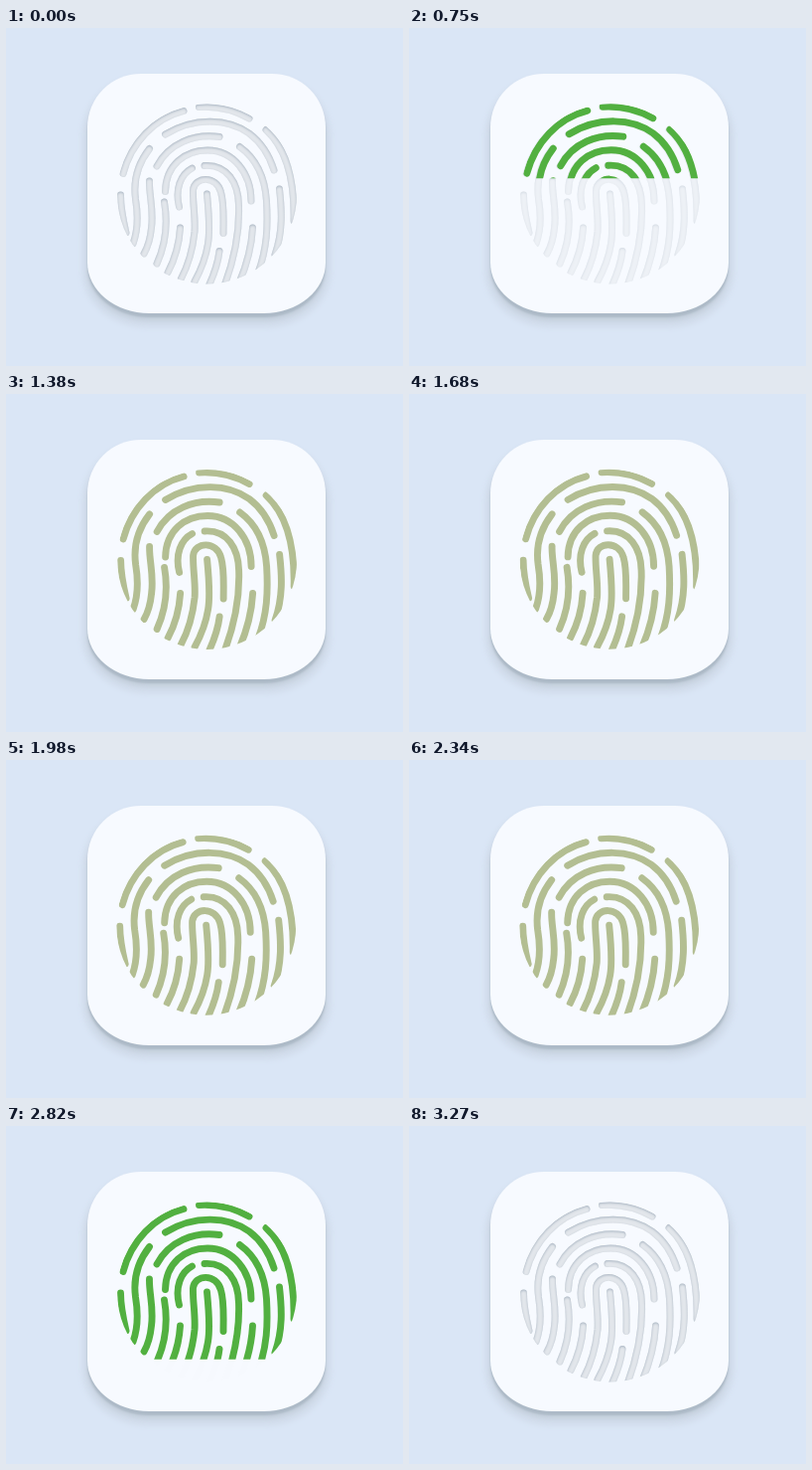
Write an HTML page that moves like this. It is 400 px wide and 340 px high and loops after 3.37 s.

```html
<!DOCTYPE html>
<html lang="en">
<head>
<meta charset="utf-8">
<title>Fingerprint scan</title>
<style>
html, body { margin: 0; width: 100%; height: 100%; overflow: hidden; background: #dae6f6; }
#tile {
  position: absolute; left: 82px; top: 46px; width: 240px; height: 241px;
  border-radius: 54px 54px 62px 62px / 54px 54px 51px 51px; background: #f7faff;
  box-shadow: 0 4px 2px #adbac7, 0 8px 4px #c5d0dd, 0 9px 5px 6px #d2ddec;
}
svg { position: absolute; left: 0; top: 0; display: block; }
</style>
</head>
<body>
<div id="tile"></div>
<svg width="400" height="340" viewBox="0 0 400 340">
  <defs>
    <clipPath id="disc"><circle cx="202.5" cy="167" r="90.5"/></clipPath>
    <clipPath id="wipe"><rect id="edge" width="400" height="340"/></clipPath>
    <filter id="inset" x="-5%" y="-5%" width="110%" height="110%" color-interpolation-filters="sRGB">
      <feGaussianBlur in="SourceAlpha" stdDeviation="1.1"/>
      <feOffset dx=".2" dy=".7" result="soft"/>
      <feFlood flood-color="#a9b5c2"/>
      <feComposite in2="soft" operator="out"/>
      <feComposite in2="SourceAlpha" operator="in" result="shade"/>
      <feMerge><feMergeNode in="SourceGraphic"/><feMergeNode in="shade"/></feMerge>
    </filter>
    <g id="print" clip-path="url(#disc)">
      <path fill="none" stroke-width="6.9" stroke-linecap="round" d="
        M118 146.500C126 116 149 91 179 83.500
        M194.500 79.500C212 78.500 229 82 245 91
        M262 102.500C281 120 291 150 290 194
        M160.500 107C190 89 224 91 245 106C257 115 265 127 270 143
        M144.500 121.500C130 140 128.500 157 130.500 172C133 187 133.500 202 128 217
        M115.500 168C115.500 180 117.500 191 121 206
        M152 139C164 116 189 106 215 109.500
        M235.500 119.500C253 132 261 152 262.500 174C264 200 263 222 254 246
        M144.500 154C144 168 149 182 146.500 201C145.500 211 143 220 139 227
        M160.500 164.500C161 138 180 123 203 123C229 123 247 146 247 174
        M159.500 175C163 195 161 217 152 237
        M187.500 141C176 147 170 162 174.500 180
        M200 138.500C223 137 234 156 234.500 178C235.500 206 231 231 219 262
        M175.500 201C174.500 217 171 231 163 246
        M219 206.500C219 190 220 177 216.500 165C212 148 190 149 188.500 163C188 176 191 190 190 205C188 224 184 238 176 253
        M202.500 167C204 182 206 202 203.500 217C201 233 196 244 190 255
        M215 224.500C213.500 237 210 247 204 260
        M248.500 201C247.500 219 244 235 235 256
        M275.500 162C278 184 279 205 271 228"/>
    </g>
  </defs>
  <g id="groove" filter="url(#inset)"><use href="#print" stroke="#e2e6eb"/></g>
  <g clip-path="url(#wipe)"><use id="ink" href="#print"/></g>
</svg>
<script>
const LOOP = 3370, TOP = 76, BOTTOM = 258;
const GREEN = [82, 176, 64], OLIVE = [179, 190, 146];
const [groove, ink, edge] = ["groove", "ink", "edge"].map(id => document.getElementById(id));

// progress of t from a to b, limited to 0..1
const ramp = (t, a, b) => Math.min(1, Math.max(0, (t - a) / (b - a)));

function draw(now) {
  const t = now % LOOP;

  // the groove fades away while scanning and returns at the end
  groove.style.opacity = 1 - ramp(t, 210, 1170) + ramp(t, 2820, 3270);

  // ink is wiped in downwards, then out upwards
  const shown = ramp(t, 412, 1232) - ramp(t, 2756, 3264);
  edge.setAttribute("height", shown >= 1 ? 340 : shown <= 0 ? 0 : TOP + (BOTTOM - TOP) * shown);

  const tint = ramp(t, 1232, 1350) - ramp(t, 2550, 2660);
  ink.setAttribute("stroke", `rgb(${GREEN.map((c, i) => Math.round(c + (OLIVE[i] - c) * tint))})`);

  // slight drift up and left, then a short pop before leaving
  const drift = ramp(t, 1000, 1900), settle = ramp(t, 2550, 2750);
  const x = 202.5 + (.8 - 1.6 * drift) * (1 - settle);
  const y = 167 - (.3 + .5 * drift) * (1 - settle);
  const scale = 1 + .07 * Math.sin(Math.PI * ramp(t, 2550, 2756));
  ink.setAttribute("transform", `translate(${x} ${y}) scale(${scale}) translate(-202.5 -167)`);

  requestAnimationFrame(draw);
}
requestAnimationFrame(draw);
</script>
</body>
</html>
```
